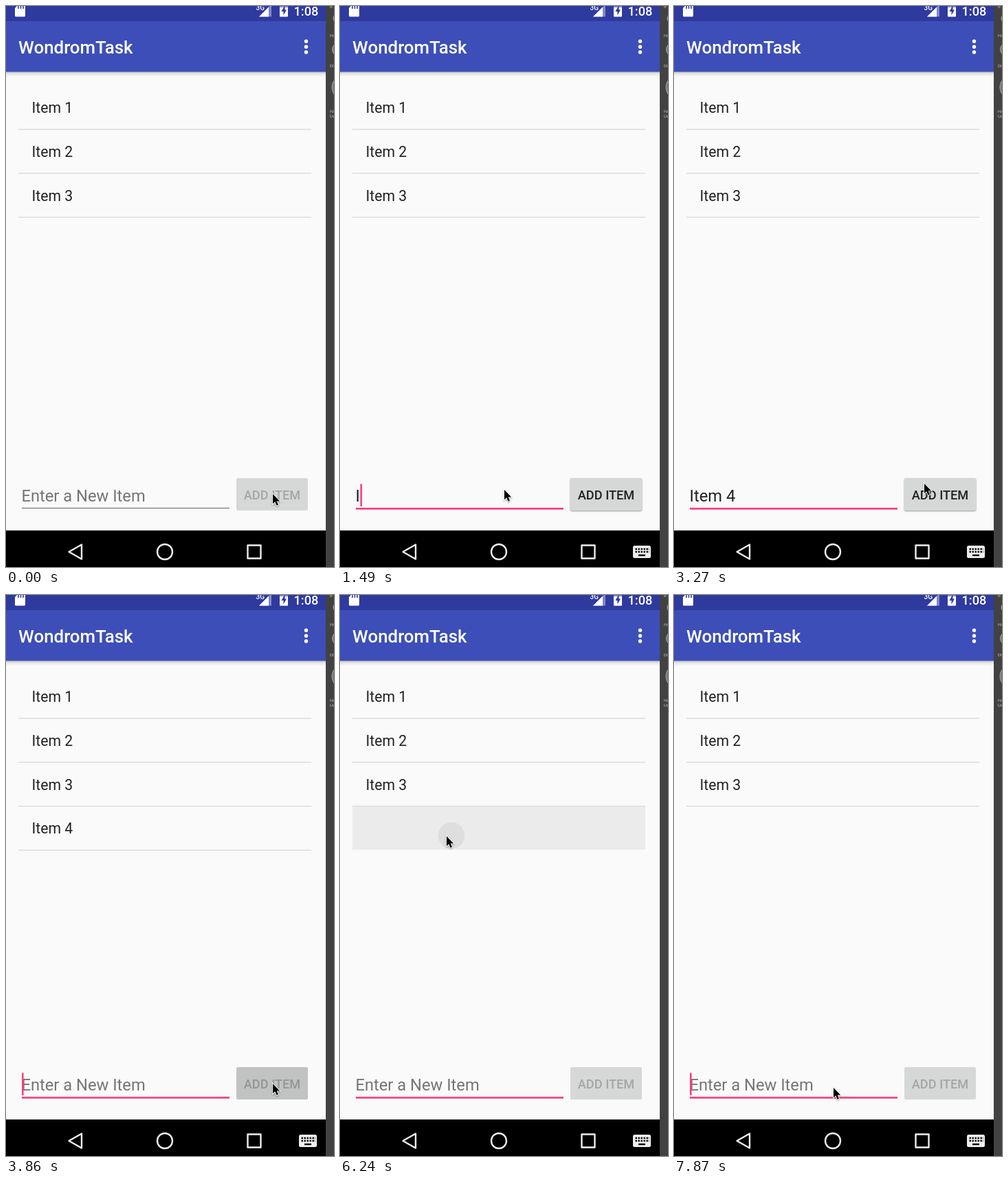
Recreate the animation shown at these times as an HTML page. Size 477 by 814 pixels, loop 8000 ms.

```html
<!DOCTYPE html>
<html lang="en">
<head>
<meta charset="utf-8">
<title>Todo list</title>
<style>
  html, body { margin: 0; height: 100%; overflow: hidden; background: #fafafa; }
  svg { display: block; width: 100%; height: 100%; font-family: Roboto, sans-serif; }
  .medium { font-weight: 500; }
  .item { font-size: 21.2px; fill: #212121; }
  .side { font-size: 6px; fill: #c4c4c4; }
  #field { font-size: 23.7px; white-space: pre; }
  #label { font-size: 18.2px; }
  #pointer { filter: drop-shadow(0 1px 1px rgba(0, 0, 0, .35)); }
</style>
</head>
<body>
<svg viewBox="0 0 477 814">
  <defs>
    <linearGradient id="shade" x2="0" y2="1">
      <stop stop-color="#000" stop-opacity=".27"/>
      <stop offset=".4" stop-color="#000" stop-opacity=".09"/>
      <stop offset="1" stop-color="#000" stop-opacity="0"/>
    </linearGradient>
  </defs>
  <rect width="477" height="814" fill="#fafafa"/>

  <!-- status bar -->
  <rect width="465" height="22" fill="#2f3a9f"/>
  <path d="M13 3L17-1H26.500Q28-1 28 1V14Q28 15.500 26.500 15.500H14.500Q13 15.500 13 14Z" fill="#fff"/>
  <path d="M18 0V4M21.500 0V4M25 0V4" stroke="#2f3a9f" stroke-width="1.600"/>
  <text class="medium" x="363.500" y="6" font-size="10" fill="#fff">3G</text>
  <path d="M368 15.500L386-2.500V15.500Z" fill="#8188c7"/>
  <path d="M368 15.500L382 1.500V15.500Z" fill="#fff"/>
  <path d="M398-2H410V15.500H398Z" fill="#8188c7"/>
  <path d="M398 2H410V14.500Q410 15.500 409 15.500H399Q398 15.500 398 14.500Z" fill="#fff"/>
  <path d="M405.500-1L400.500 8H403.500V13.500L408 5.500H405.500Z" fill="#2f3a9f"/>
  <text class="medium" x="418.500" y="14" font-size="18.200" fill="#fff">1:08</text>

  <!-- app bar -->
  <rect y="95" width="465" height="8" fill="url(#shade)"/>
  <rect y="22" width="465" height="73.500" fill="#3d4eb8"/>
  <text class="medium" x="18" y="69" font-size="25.900" fill="#fff">WondromTask</text>
  <path d="M436.500 51.300h0M436.500 59.200h0M436.500 67h0" stroke="#fff" stroke-width="5.400" stroke-linecap="round"/>

  <g id="list"></g>
  <g id="ripple">
    <rect x="18" y="307" width="426" height="62.500" fill="#ebebeb"/>
    <circle cx="162" cy="349" r="19.300" fill="#dedede"/>
  </g>

  <!-- input row -->
  <text id="field" x="22.500" y="719.300"></text>
  <rect id="underline" x="23" width="302"/>
  <rect id="caret" y="693.500" width="2.600" height="32.500" fill="#ff3e80"/>
  <rect id="button" x="335" y="685" width="104" height="47" rx="2"/>
  <text id="label" class="medium" x="387" y="716" text-anchor="middle">ADD ITEM</text>

  <!-- navigation bar -->
  <rect y="761" width="465" height="53"/>
  <g fill="none" stroke="#eee" stroke-width="2.400" stroke-linejoin="round">
    <path d="M91.500 792L110 781.500V802.500Z"/>
    <circle cx="231" cy="792" r="11"/>
    <rect x="351.500" y="782.500" width="19" height="19"/>
  </g>
  <g id="keyboard">
    <rect x="426" y="783" width="26" height="18" rx="2.500" fill="#eee"/>
    <path d="M429.500 788H450M429.500 792H450" stroke="#000" stroke-width="2.400" stroke-dasharray="2.400 1.600"/>
    <path d="M434 797H444" stroke="#000" stroke-width="2.400"/>
  </g>

  <!-- emulator side panel -->
  <rect x="465" width="12" height="814" fill="#424242"/>
  <g fill="#777" stroke="#aaa">
    <circle cx="483" cy="18" r="7"/>
    <circle cx="484" cy="63" r="9.500"/>
    <circle cx="491" cy="118" r="17"/>
  </g>
  <text class="side" x="471" y="3">B</text>
  <text class="side" x="471" y="45">HA</text>
  <text class="side" x="471" y="89">DI</text>
  <text class="side" x="471" y="155">HA</text>
  <text class="side" x="471" y="162">Us</text>

  <path id="pointer" d="M0 0V14.300L3.200 11.300L5.600 16.800L8 15.800L5.700 10.400H10.200Z"
        stroke="#fff" stroke-width="1.800" paint-order="stroke"/>
</svg>
<script>
const LOOP = 8000, STEP = 63.75;
const $ = id => document.getElementById(id);
const set = (id, attrs) => {
  for (const key in attrs) $(id).setAttribute(key, attrs[key]);
};
const show = (id, on) => set(id, { visibility: on ? 'visible' : 'hidden' });

// Each track holds its value from the given time until the next entry.
const pointer = [
  [0, 388, 708], [300, 352, 707], [450, 274, 704], [600, 239, 702],
  [2820, 250, 697], [2970, 285, 686], [3120, 327, 683], [3270, 364, 693],
  [3420, 382, 704], [3570, 388, 709],
  [4160, 355, 665], [4310, 258, 545], [4460, 179, 453],
  [4750, 172, 413], [4900, 167, 384], [5050, 164, 370], [5200, 158, 355], [5350, 155, 350],
  [7130, 190, 520], [7280, 243, 718], [7580, 238, 716], [7870, 232, 715]
];
const typed = [
  [0, ''], [1340, 'I'], [1940, 'It'], [2090, 'Item'], [2230, 'Item '],
  [2820, 'Item 4'], [3860, '']
];
const caret = [
  [0, false], [890, true], [3270, false], [3860, true], [4310, false], [4750, true],
  [5200, false], [5790, true], [6240, false], [6830, true], [7280, false], [7580, true]
];
const at = (track, t) => track.findLast(entry => entry[0] <= t);

$('list').innerHTML = [0, 1, 2, 3].map(i => `<g id="item${i}">
  <text class="item" x="37.500" y="${155.2 + i * STEP}">Item ${i + 1}</text>
  <rect x="18" y="${178.3 + i * STEP}" width="426" height="1.300" fill="#d9d9d9"/></g>`).join('');

function draw(t) {
  const text = at(typed, t)[1];
  const focus = t >= 890, pressed = t >= 3860 && t < 4160;
  const [, x, y] = at(pointer, t);

  show('item3', t >= 3860 && t < 6240);
  show('ripple', t >= 6240 && t < 6540);
  show('keyboard', focus);
  show('caret', at(caret, t)[1]);

  $('field').textContent = text || 'Enter a New Item';
  set('field', { fill: text ? '#212121' : '#757575' });
  set('caret', { x: 23 + (text ? $('field').getComputedTextLength() : 0) });
  set('underline', focus
    ? { y: 728, height: 2.7, fill: '#ff3e80' }
    : { y: 728, height: 1.2, fill: '#777' });

  const lift = !text ? 0 : t < 1490 ? 1 : 2;
  set('button', { fill: pressed ? '#c1c3c2' : '#d6d8d7' });
  $('button').style.filter = lift ? `drop-shadow(0 ${lift * .7}px ${lift * .6}px rgba(0,0,0,.4))` : 'none';
  set('label', { fill: text ? '#212121' : pressed ? '#949595' : '#a4a6a5' });
  set('pointer', { transform: `translate(${x} ${y})` });
}

function frame() {
  draw(performance.now() % LOOP);
  requestAnimationFrame(frame);
}
frame();
</script>
</body>
</html>
```
